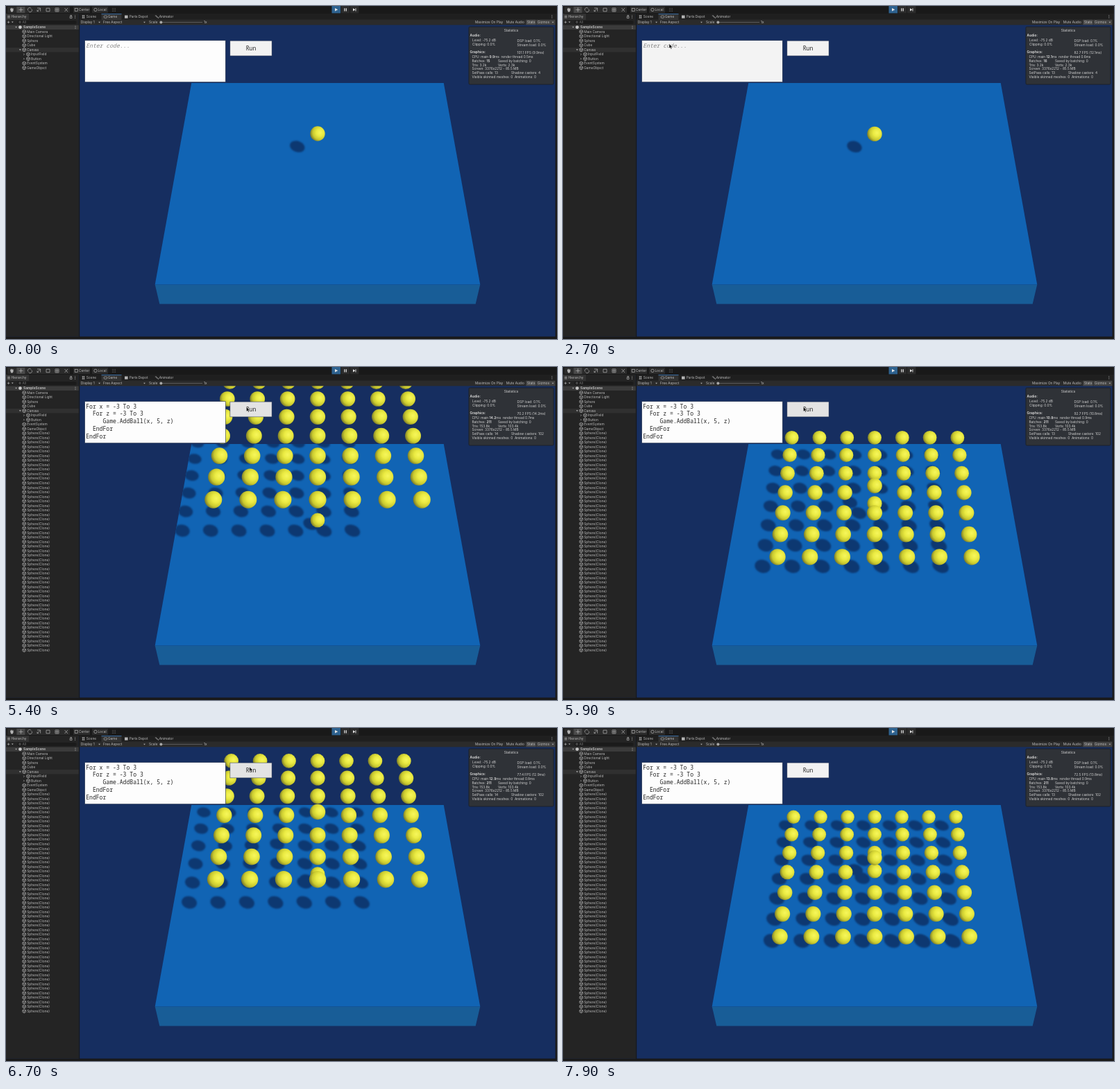
Write an HTML page with a canvas that moves like this. It is 794 px wide and 480 px high and loops after 8000 ms.

```html
<!DOCTYPE html>
<html lang="en">
<head>
<meta charset="utf-8">
<title>Ball grid</title>
<style>
  html, body { margin: 0; width: 100%; height: 100%; overflow: hidden; background: #191919; }
  #stage { position: relative; width: 794px; height: 480px; overflow: hidden; }
  canvas, svg { position: absolute; left: 0; top: 0; display: block; }
  text { font: 4.8px Inter, Roboto, sans-serif; fill: #bcbcbc; white-space: pre; }
  .b { font-weight: 700; }
  .mid { text-anchor: middle; }
  .code { font: 8.1px "Noto Sans Mono", monospace; fill: #262626; }
  .hint { font-style: italic; fill: #858585; }
  .line { fill: none; stroke: #b4b4b4; stroke-width: .7; }
  .fill { fill: #b4b4b4; }
  #stats text { fill: #d2d2d2; }
</style>
</head>
<body>
<div id="stage">
<canvas id="scene" width="794" height="480"></canvas>
<svg width="794" height="480" viewBox="0 0 794 480">
  <defs>
    <g id="cube" class="line" stroke-width=".55">
      <path d="M0-2.6 2.3-1.3V1.3L0 2.6-2.3 1.3V-1.3ZM-2.3-1.3 0 0 2.3-1.3M0 0V2.6"/>
    </g>
    <path id="drop" class="fill" d="M-1.4-.8H1.4L0 1Z"/>
    <g id="dots" class="fill"><circle cy="-1.7" r=".5"/><circle r=".5"/><circle cy="1.7" r=".5"/></g>
  </defs>

  <!-- frame around the game view -->
  <path fill="#191919" d="M0 0H794V11H0ZM0 476.6H794V480H0ZM791.6 11H794V480H791.6ZM104.8 11H106.2V480H104.8Z"/>
  <rect y="11" width="104.8" height="465.6" fill="#242424"/>
  <rect x="106" y="11" width="688" height="9" fill="#1f1f1f"/>
  <rect x="106" y="19.6" width="686" height="7.8" fill="#2b2b2b"/>

  <!-- toolbar -->
  <rect x="2" y="1" width="90" height="9" fill="#2b2b2b"/>
  <rect x="15.4" y="1" width="12" height="9" fill="#4a4a4a"/>
  <path class="fill" d="M6 5 7 2.6 8 4 8.6 2.2 9.4 4 10.6 3V6.5L9.5 8.4H7.3Z"/>
  <path class="line" d="M18.5 5.4H24.5M21.5 2.4V8.4M31.8 6.5A2.6 2.6 0 0 1 36.3 3.6M37 4.6A2.6 2.6 0 0 1 32.6 7.6M45 3H49.6V7.6M45 7.6 49 3.6M45 5.5V7.6H47M58 3.2H63V7.8H58ZM71 5.5H76M73.5 3V8M71 3H76V8H71ZM84.5 3 89 8M89 3 84.5 8"/>
  <rect x="97" y="1" width="24" height="9" fill="#2b2b2b"/>
  <rect x="124" y="1" width="23" height="9" fill="#2b2b2b"/>
  <rect x="99.2" y="3.3" width="4" height="4" class="line"/>
  <circle cx="129" cy="5.4" r="2.2" class="line"/>
  <text x="105" y="7.2">Center</text><text x="132.4" y="7.2">Local</text>
  <path class="line" stroke-dasharray="1 1" opacity=".6" d="M153 3.5H158M153 5.5H158M153 7.5H158"/>
  <rect x="469.5" y="0" width="12.6" height="10.4" fill="#2e628f"/>
  <rect x="482.8" y="0" width="12.4" height="10.4" fill="#2b2b2b"/>
  <rect x="496" y="0" width="12.4" height="10.4" fill="#2b2b2b"/>
  <path fill="#e4e4e4" d="M474 3 478.3 5.3 474 7.6ZM487.3 3.2H488.5V7.5H487.3ZM489.7 3.2H490.9V7.5H489.7ZM500 3.2 503.3 5.3 500 7.5ZM503.5 3.2H504.4V7.5H503.5Z"/>

  <!-- hierarchy header -->
  <path fill="#333" d="M0 11H33V20H0Z"/>
  <path class="line" d="M2.2 14H5.8M2.2 15.5H5.8M2.2 17H5.8M92.2 15.2H95V17.6H92.2ZM92.8 15V13.4H94.5V15M1.8 23.3H5.4M3.6 21.5V25.1"/>
  <text x="7.6" y="17.2">Hierarchy</text>
  <use href="#dots" x="99.6" y="15.5"/><use href="#drop" x="9.3" y="23.3"/>
  <rect x="16.5" y="21" width="85" height="5" rx="2" fill="#1b1b1b"/>
  <circle cx="20" cy="23.2" r="1.2" class="line" opacity=".6"/>
  <text x="23.5" y="25" opacity=".5">All</text>
  <rect y="27.6" width="104.8" height="6.3" fill="#3b3b3b"/>
  <use href="#drop" x="14.6" y="30.6"/><circle cx="20.4" cy="30.6" r="2.4" fill="#c8c8c8"/>
  <text x="25" y="32.3" class="b">SampleScene</text><use href="#dots" x="100" y="30.7"/>
  <rect y="60" width="104.8" height="6.4" fill="#303030"/>
  <g id="rows"></g><g id="clones"></g>

  <!-- game tabs -->
  <rect x="137.5" y="11" width="29" height="9" fill="#333"/>
  <rect x="137.5" y="11" width="29" height=".8" fill="#3a79bb"/>
  <path class="line" d="M109.5 14H113.5M109.5 17H113.5M110.5 13V18M112.5 13V18"/>
  <rect x="141" y="14" width="4.8" height="3.2" rx="1.6" class="line"/>
  <path class="fill" d="M171 13.5H175.6V17.7H171Z"/>
  <path class="line" d="M214.8 14H217V16H219.4V18"/>
  <text x="115.8" y="17.2">Scene</text><text x="147" y="17.2">Game</text>
  <text x="177.8" y="17.2">Parts Depot</text><text x="220.8" y="17.2">Animator</text>
  <use href="#dots" x="786.8" y="15.3"/>
  <text x="107.8" y="25.2">Display 1</text><use href="#drop" x="134.6" y="23.5"/>
  <text x="140" y="25.2">Free Aspect</text><use href="#drop" x="199.5" y="23.5"/>
  <text x="206" y="25.2">Scale</text>
  <path stroke="#666" stroke-width=".8" d="M223 23.5H283"/><circle cx="223.4" cy="23.5" r="2" fill="#a8a8a8"/>
  <text x="285" y="25.2">1x</text>
  <rect x="749.5" y="19.8" width="14" height="7.4" fill="#4a4a4a"/>
  <rect x="764.4" y="19.8" width="27" height="7.4" fill="#424242"/>
  <text x="676" y="25.2">Maximize On Play</text><text x="720.8" y="25.2">Mute Audio</text>
  <text x="751" y="25.2">Stats</text><text x="766" y="25.2">Gizmos</text><use href="#drop" x="788" y="23.5"/>

  <!-- input and button -->
  <rect id="field" x="113.7" y="49.7" width="202.6" height="60" stroke="#25324d" stroke-width=".6"/>
  <text id="hint" class="code hint" x="115.2" y="59.5">Enter code...</text>
  <g id="code"></g>
  <rect id="caret" width=".6" height="9" fill="#333"/>
  <rect id="run" x="322.9" y="50.1" width="60.2" height="21.8" stroke="#25324d" stroke-width=".5"/>
  <text class="code mid" x="353" y="64.4">Run</text>

  <!-- statistics -->
  <g id="stats">
    <rect x="667" y="30" width="122" height="83" rx="1.5" fill="#303236" fill-opacity=".96" stroke="#1c2028"/>
    <text x="728" y="36.6" class="mid">Statistics</text>
    <text x="668.6" y="44" class="b">Audio:</text>
    <text x="672" y="51.3">Level: -75.2 dB</text><text x="736.6" y="52.2">DSP load: 0.1%</text>
    <text x="672" y="57">Clipping: 0.0%</text><text x="736.6" y="57.7">Stream load: 0.0%</text>
    <text x="668.6" y="67.5" class="b">Graphics:</text><text id="fps" x="736.6" y="68.8"></text>
    <text x="671.4" y="74.6">CPU: main <tspan id="main" class="b"></tspan>ms  render thread <tspan id="render"></tspan>ms</text>
    <text x="671.4" y="80.6">Batches: <tspan id="batches" class="b"></tspan></text><text x="709" y="80.6">Saved by batching: 0</text>
    <text x="671.4" y="86.5">Tris: <tspan id="tris"></tspan></text><text x="709" y="86.5">Verts: <tspan id="verts"></tspan></text>
    <text x="671.4" y="92.3">Screen: 3376x2212 - 85.5 MB</text>
    <text x="671.4" y="98.4">SetPass calls: <tspan id="passes"></tspan></text><text x="728" y="98.4">Shadow casters: <tspan id="casters"></tspan></text>
    <text x="671.4" y="104.3">Visible skinned meshes: 0  Animations: 0</text>
  </g>
  <path id="cursor" d="M0 0V6.6L1.6 5.3 2.7 7.8 3.8 7.3 2.8 4.9H4.8Z" fill="#000" stroke="#fff" stroke-width=".5"/>
</svg>
</div>
<script>
const $ = id => document.getElementById(id);
const ctx = $('scene').getContext('2d');
const LOOP = 8000, SPAWN = 5.165, PRESS = 5.05, PASTE = 3.6, FOCUS = 2.8;

// Hierarchy rows and the code text
const row = (x, y, name) =>
  `<use href="#cube" x="${x - 4}" y="${y}"/><text x="${x}" y="${y + 1.7}">${name}</text>`;
const names = ['Main Camera', 'Directional Light', 'Sphere', 'Cube', 'Canvas', 'InputField', 'Button', 'EventSystem', 'GameObject'];
const rowY = i => 37.1 + i * 6.51;
$('rows').innerHTML = names.map((n, i) => row(i === 5 || i === 6 ? 36 : 30.2, rowY(i), n)).join('') +
  `<use href="#drop" x="20.3" y="${rowY(4)}"/>` +
  [5, 6].map(i => `<path class="line" d="M25.2 ${rowY(i) - 1.2}l1.2 1.2-1.2 1.2"/>`).join('');
$('clones').innerHTML = Array.from({ length: 49 }, (_, i) => row(30.2, rowY(i + 9), 'Sphere(Clone)')).join('');
$('code').innerHTML = ['For x = -3 To 3', '  For z = -3 To 3', '     Game.AddBall(x, 5, z)', '  EndFor', 'EndFor']
  .map((s, i) => `<text class="code" x="115.2" y="${59.5 + i * 10.75}">${s}</text>`).join('');

// Camera pitched 45 degrees; heights are measured from the platform top
const project = (x, h, z) => {
  const scale = 1 / (0.0244275 + 0.000617 * (z - h));
  return { x: 449 + x * scale, y: 252 - (0.344 + 0.7071 * (z + h)) * scale, scale };
};

// Free flight between successive contacts [seconds, height]
const flight = (path, t) => {
  let i = path.findIndex(p => p[0] > t) - 1;
  if (i < 0) i = 0;
  const [t0, h0] = path[i], [t1, h1] = path[i + 1];
  return h0 + (h1 - h0) * (t - t0) / (t1 - t0) + 4.905 * (t - t0) * (t1 - t);
};
const R = 0.25;
const firstPath = [[.597, R], [1.853, R], [3.06, R], [4.215, R], [5.335, R], [5.856, 1.66], [6.04, R], [6.174, 1.21],
  [6.44, R], [7.214, R], [7.503, .82], [7.586, R], [7.664, .74], [8.1, .9]];
const gridPath = [[SPAWN, 4.5], [6.096, R], [7.794, R], [9.343, R]];
const centrePath = [[SPAWN, 4.5], [5.856, 2.16], [6.174, 1.71], [7.503, 1.32], [7.664, 1.24], [8.1, 1.595]];

function ballsAt(t) {
  const balls = [{ x: 0, z: 0, h: flight(firstPath, t) }];
  if (t >= SPAWN) {
    for (let x = -3; x <= 3; x++)
      for (let z = -3; z <= 3; z++)
        balls.push({ x, z, h: flight(x || z ? gridPath : centrePath, t) });
  }
  return balls.sort((a, b) => (b.z - b.h) - (a.z - a.h));
}

function polygon(points) {
  points.forEach(([x, h, z], i) => {
    const p = project(x, h, z);
    i ? ctx.lineTo(p.x, p.y) : ctx.moveTo(p.x, p.y);
  });
  ctx.closePath();
}
function face(color, points) {
  ctx.beginPath();
  polygon(points);
  ctx.fillStyle = color;
  ctx.fill();
}

function shadow({ x, z, h }) {
  const cx = x - 0.4196 * h, cz = z + 0.7267 * h;
  polygon(Array.from({ length: 24 }, (_, i) => {
    const a = i * Math.PI / 12, u = Math.cos(a) * R / 0.766, v = Math.sin(a) * R;
    return [cx - u * 0.5 + v * 0.866, 0, cz + u * 0.866 + v * 0.5];
  }));
}

function sphere({ x, z, h }) {
  const p = project(x, h, z), r = R * p.scale;
  const lx = p.x + 0.32 * r, ly = p.y - 0.15 * r;
  const g = ctx.createRadialGradient(lx, ly, 0, lx, ly, r * 1.36);
  g.addColorStop(0, '#f6f65c');
  g.addColorStop(.35, '#ebeb43');
  g.addColorStop(.7, '#c9c92f');
  g.addColorStop(1, '#74742a');
  ctx.fillStyle = g;
  ctx.beginPath();
  ctx.arc(p.x, p.y, r, 0, 7);
  ctx.fill();
}

function drawScene(t) {
  const balls = ballsAt(t);
  const top = [[-5, 0, 5], [5, 0, 5], [5, 0, -5], [-5, 0, -5]];
  ctx.fillStyle = '#162e60';
  ctx.fillRect(0, 0, 794, 480);
  face('#185d97', [[-5, 0, -5], [5, 0, -5], [5, -1, -5], [-5, -1, -5]]);
  face('#1164b4', top);
  ctx.save();
  ctx.beginPath();
  polygon(top);
  ctx.clip();
  ctx.filter = 'blur(0.8px)';
  ctx.fillStyle = '#0d3871';
  ctx.beginPath();
  balls.forEach(shadow);
  ctx.fill();
  ctx.restore();
  balls.forEach(sphere);
}

// Pointer stops [seconds, x, y]
const pointer = [[1.4, 230, -12], [2.2, 153, 54.5], [3.7, 153, 54.5], [4, 216, 54], [4.3, 216, 54], [4.8, 346.5, 57.5],
  [6.3, 346.5, 57.5], [6.6, 350.8, 56], [7.1, 350.8, 56], [7.5, 380, -12], [9, 380, -12]];
function pointerAt(t) {
  if (t <= pointer[0][0]) return [230, -12];
  const i = pointer.findIndex(p => p[0] > t);
  const [t0, x0, y0] = pointer[i - 1], [t1, x1, y1] = pointer[i];
  const u = (t - t0) / (t1 - t0), e = u * u * (3 - 2 * u);
  return [x0 + (x1 - x0) * e, y0 + (y1 - y0) * e];
}

// [seconds, fps, render, batches, tris, verts, passes, casters]
const few = ['3.2k', '2.3k'], many = ['153.8k', '103.4k'];
const readings = [
  [0, 101.1, .5, 15, ...few, 13, 4], [2.5, 82.7, .6, 16, ...few, 13, 4], [3.9, 96, .6, 16, '3.3k', '2.5k', 13, 4],
  [5.2, 70.2, .7, 211, ...many, 14, 102], [5.8, 92.7, .9, 211, ...many, 13, 102],
  [6.5, 77.4, .8, 211, ...many, 14, 102], [7.7, 72.5, .9, 211, ...many, 13, 102]];

const show = (id, on) => $(id).style.display = on ? '' : 'none';
const within = (t, a, b) => t >= a && t < b;

function drawUi(t) {
  const [, fps, render, batches, tris, verts, passes, casters] = readings.filter(r => r[0] <= t).pop();
  const ms = (1000 / fps).toFixed(1);
  const values = { fps: `${fps.toFixed(1)} FPS (${ms}ms)`, main: ms, render, batches, tris, verts, passes, casters };
  for (const id in values) $(id).textContent = values[id];

  const pasted = t >= PASTE;
  show('clones', t >= SPAWN);
  show('hint', !pasted);
  show('code', pasted);
  show('caret', within(t, FOCUS + .1, PRESS) && Math.floor((t - 2.9) / .59) % 2 === 0);
  $('caret').setAttribute('x', pasted ? 144.6 : 115.2);
  $('caret').setAttribute('y', pasted ? 95.2 : 52.2);
  $('field').setAttribute('fill', within(t, FOCUS, FOCUS + .1) ? '#c8c8c8' : within(t, 2.1, PRESS) ? '#f3f3f3' : '#fdfdfd');
  $('run').setAttribute('fill', within(t, PRESS, SPAWN) ? '#c8c8c8' : within(t, 4.7, 7.2) ? '#e3e3e3' : '#f2f2f2');
  $('cursor').setAttribute('transform', `translate(${pointerAt(t)})`);
}

// Ten steps a second, with the stalls of the recording
const stalls = [24, 49, 64, 69];
let shown = -1;
function tick() {
  let step = Math.floor((performance.now() % LOOP) / 100 + 0.001);
  if (stalls.includes(step)) step--;
  const t = step < 11 ? 0.93 : step / 10;
  if (t !== shown) {
    shown = t;
    drawScene(t);
    drawUi(t);
  }
  requestAnimationFrame(tick);
}
tick();
</script>
</body>
</html>
```
